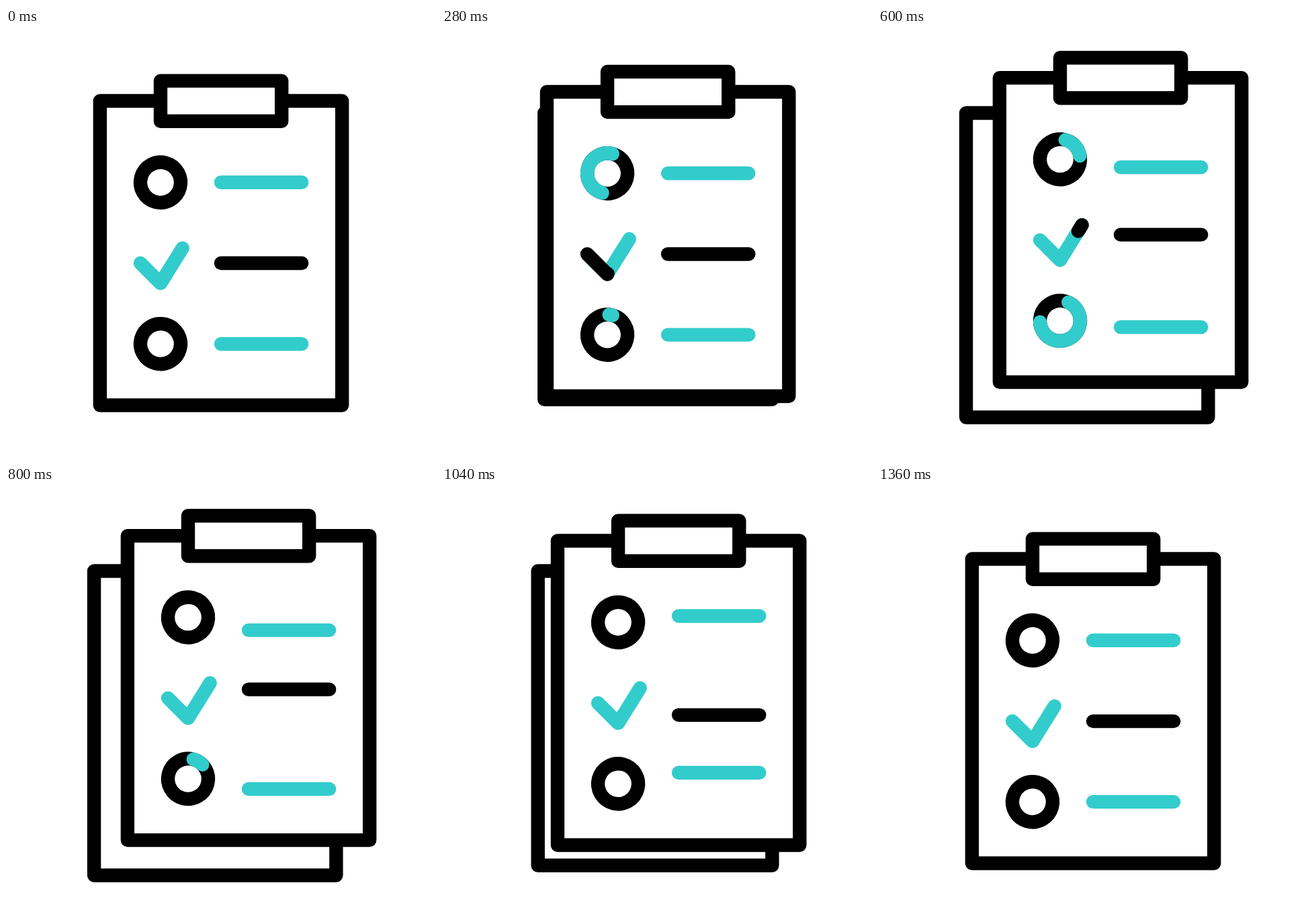
These frames come from a looping animation (640 px wide and 640 px high, 1480 ms). An HTML page with a canvas:

```html
<!DOCTYPE html>
<html lang="en">
<head>
<meta charset="utf-8">
<title>Checklist</title>
<style>
html, body { margin: 0; height: 100%; overflow: hidden; background: #fff; }
canvas { display: block; }
</style>
</head>
<body>
<canvas id="stage" width="640" height="640"></canvas>
<script>
const ctx = document.getElementById('stage').getContext('2d');
const LOOP = 1480, STEP = 40;
const BLACK = '#000', CYAN = '#33cccc';
const WIDTH = 360.3, HEIGHT = 453;

// Smooth progress from 0 to 1 between two times
const ease = (t, from, to) => {
  const u = Math.min(1, Math.max(0, (t - from) / (to - from)));
  return u * u * (3 - 2 * u);
};

function box(x, y, w, h) {
  ctx.fillStyle = '#fff';
  ctx.strokeStyle = BLACK;
  ctx.fillRect(x, y, w, h);
  ctx.strokeRect(x, y, w, h);
}

function stroke(path, color) {
  ctx.strokeStyle = color;
  ctx.stroke(path);
}

// Strokes the part of a path between two fractions of its length
function trim(path, length, start, end, color) {
  if (end - start < 0.001) return;
  ctx.setLineDash([(end - start) * length, 999]);
  ctx.lineDashOffset = -start * length;
  stroke(path, color);
  ctx.setLineDash([]);
}

function ring(y) {
  const path = new Path2D(), top = -75 * Math.PI / 180;
  path.arc(230, y, 30, top, top - 2 * Math.PI, true);
  return path;
}

const upperRing = ring(229.9), lowerRing = ring(470.2);
const ringLength = 60 * Math.PI;
const check = new Path2D('M200 350 L230 380 L262.7 327.6');
const checkLength = 104.2;

// Resting height, first sway, second sway
const lines = [
  { y: 229.8, first: 19.5, second: -9.3, color: CYAN },
  { y: 350, first: -13.1, second: 17.8, color: BLACK },
  { y: 470.2, first: 15.5, second: -16.5, color: CYAN }
];

function draw(t) {
  ctx.clearRect(0, 0, 640, 640);
  ctx.lineWidth = 20.4;
  ctx.lineCap = ctx.lineJoin = 'round';

  // Back page grows from its top right corner
  const back = 0.85 + 0.15 * (ease(t, 120, 400) - ease(t, 920, 1320));
  box(491.4 - WIDTH * back, 126.5, WIDTH * back, HEIGHT * back);

  const lift = ease(t, 160, 440) - ease(t, 920, 1320);
  ctx.save();
  ctx.translate(41 * lift, -34.4 * lift);
  box(139.9, 108.5, WIDTH, HEIGHT);
  box(230, 78.6, 180.2, 60.1);

  stroke(upperRing, BLACK);
  trim(upperRing, ringLength, ease(t, 280, 720), ease(t, 80, 480), CYAN);
  stroke(lowerRing, BLACK);
  trim(lowerRing, ringLength, ease(t, 440, 880), ease(t, 240, 640), CYAN);
  stroke(check, CYAN);
  trim(check, checkLength, ease(t, 280, 680), ease(t, 120, 480), BLACK);

  const toFirst = ease(t, 280, 840), toSecond = ease(t, 840, 1040), toRest = ease(t, 1040, 1374);
  for (const { y, first, second, color } of lines) {
    const sway = first * (toFirst - toSecond) + second * (toSecond - toRest);
    stroke(new Path2D(`M320 ${y + sway} h120.2`), color);
  }
  ctx.restore();
}

function tick() {
  const t = performance.now() % LOOP;
  draw(Math.floor(t / STEP) * STEP);
  requestAnimationFrame(tick);
}
tick();
</script>
</body>
</html>
```
